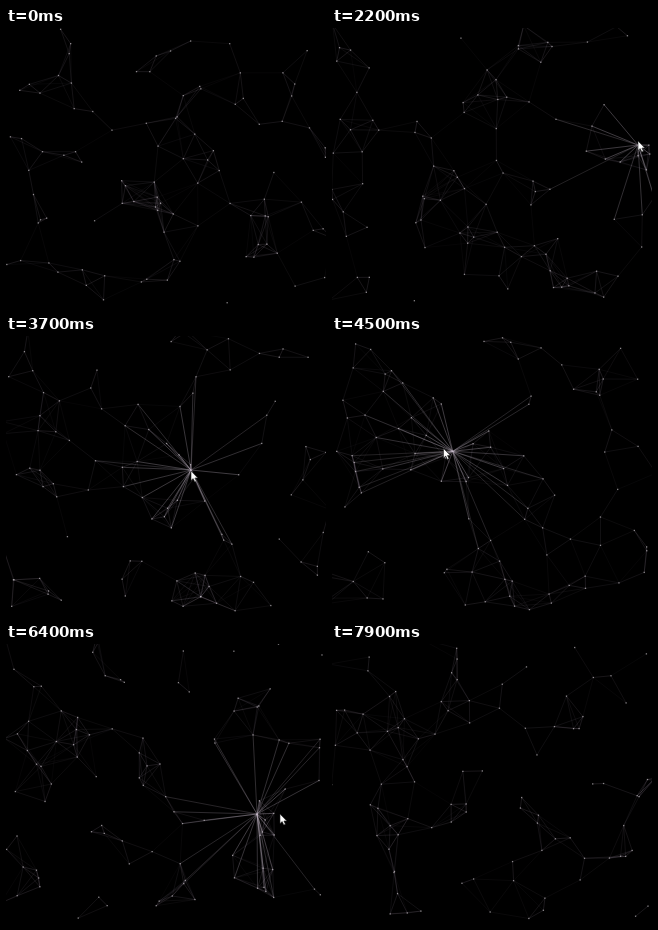
Recreate the animation shown at these times as an HTML page with a canvas. Size 320 px wide and 280 px high, loop 8 s.

```html
<!DOCTYPE html>
<html lang="en">
<head>
<meta charset="utf-8">
<title>Particle web</title>
<style>
  html, body { margin: 0; width: 100%; height: 100%; overflow: hidden; background: #000; }
  canvas { display: block; width: 100vw; height: 100vh; }
</style>
</head>
<body>
<canvas id="web" width="320" height="280"></canvas>
<script>
const WIDTH = 320, HEIGHT = 280, FLOOR = 275;
const LOOP = 8000, TICK = 100;
const COUNT = 98, MARGIN = 6, SPEED = 33;
const ctx = document.getElementById('web').getContext('2d');

const links = { reach: 43, color: '200,182,206', base: 0.04, gain: 0.14 };
const rays = { reach: 102, color: '205,192,208', base: 0.2, gain: 0.24 };
const arrow = new Path2D('M0 0V9.5L2.2 7.6L3.8 11L5.4 10.2L3.9 7H6.8Z');

// Pointer path: time, x, y.
const pointerPath = [
  [1900, 322, 124], [2100, 306, 117], [2200, 306, 113], [3600, 185, 134], [3700, 185, 135],
  [4800, 84, 104], [5200, 105, 105], [5300, 117, 105], [6300, 251, 170],
  [6400, 274, 170], [6700, 330, 172]
];

function seeded(seed) {
  return () => {
    seed = (seed * 1664525 + 1013904223) % 4294967296;
    return seed / 4294967296;
  };
}

const random = seeded(2024);
const between = (low, high) => low + (high - low) * random();
const particles = Array.from({ length: COUNT }, () => ({
  x: between(-MARGIN, WIDTH + MARGIN),
  y: between(-MARGIN, FLOOR),
  vx: between(-SPEED, SPEED),
  vy: between(-SPEED, SPEED)
}));

// Reflects a straight path between two walls.
function bounce(value, low, high) {
  const span = high - low;
  const turn = (((value - low) % (2 * span)) + 2 * span) % (2 * span);
  return low + Math.min(turn, 2 * span - turn);
}

function particleAt(p, t) {
  const seconds = t / 1000;
  return {
    x: bounce(p.x + p.vx * seconds, -MARGIN, WIDTH + MARGIN),
    y: bounce(p.y + p.vy * seconds, -MARGIN, FLOOR)
  };
}

function pointerAt(t) {
  const i = pointerPath.findIndex(key => key[0] > t);
  if (i < 1) return null;
  const [t0, x0, y0] = pointerPath[i - 1], [t1, x1, y1] = pointerPath[i];
  const k = (t - t0) / (t1 - t0);
  return { x: x0 + (x1 - x0) * k, y: y0 + (y1 - y0) * k };
}

function connect(a, b, { reach, color, base, gain }) {
  const dx = a.x - b.x, dy = a.y - b.y;
  const near = 1 - (dx * dx + dy * dy) / (reach * reach);
  if (near <= 0) return;
  ctx.strokeStyle = `rgba(${color},${base + gain * near})`;
  ctx.beginPath();
  ctx.moveTo(a.x, a.y);
  ctx.lineTo(b.x, b.y);
  ctx.stroke();
}

function drawPointer({ x, y }) {
  ctx.save();
  ctx.translate(x, y);
  ctx.fillStyle = '#fff';
  ctx.strokeStyle = '#222';
  ctx.lineWidth = 0.6;
  ctx.fill(arrow);
  ctx.stroke(arrow);
  ctx.restore();
}

function draw(time) {
  const t = Math.floor((time % LOOP) / TICK) * TICK;
  const points = particles.map(p => particleAt(p, t));
  const pointer = pointerAt(t);
  // The web follows one tick behind the pointer.
  const hub = pointer && (pointerAt(t - TICK) || pointer);

  ctx.fillStyle = '#000';
  ctx.fillRect(0, 0, WIDTH, HEIGHT);
  ctx.lineWidth = 0.8;
  points.forEach((p, i) => {
    for (const q of points.slice(i + 1)) connect(p, q, links);
    if (hub) connect(p, hub, rays);
  });
  ctx.fillStyle = 'rgba(215,210,215,.62)';
  for (const p of points) ctx.fillRect(p.x - 0.65, p.y - 0.65, 1.3, 1.3);
  if (pointer) drawPointer(pointer);
}

const start = performance.now();
function frame() {
  draw(performance.now() - start);
  requestAnimationFrame(frame);
}
frame();
</script>
</body>
</html>
```
